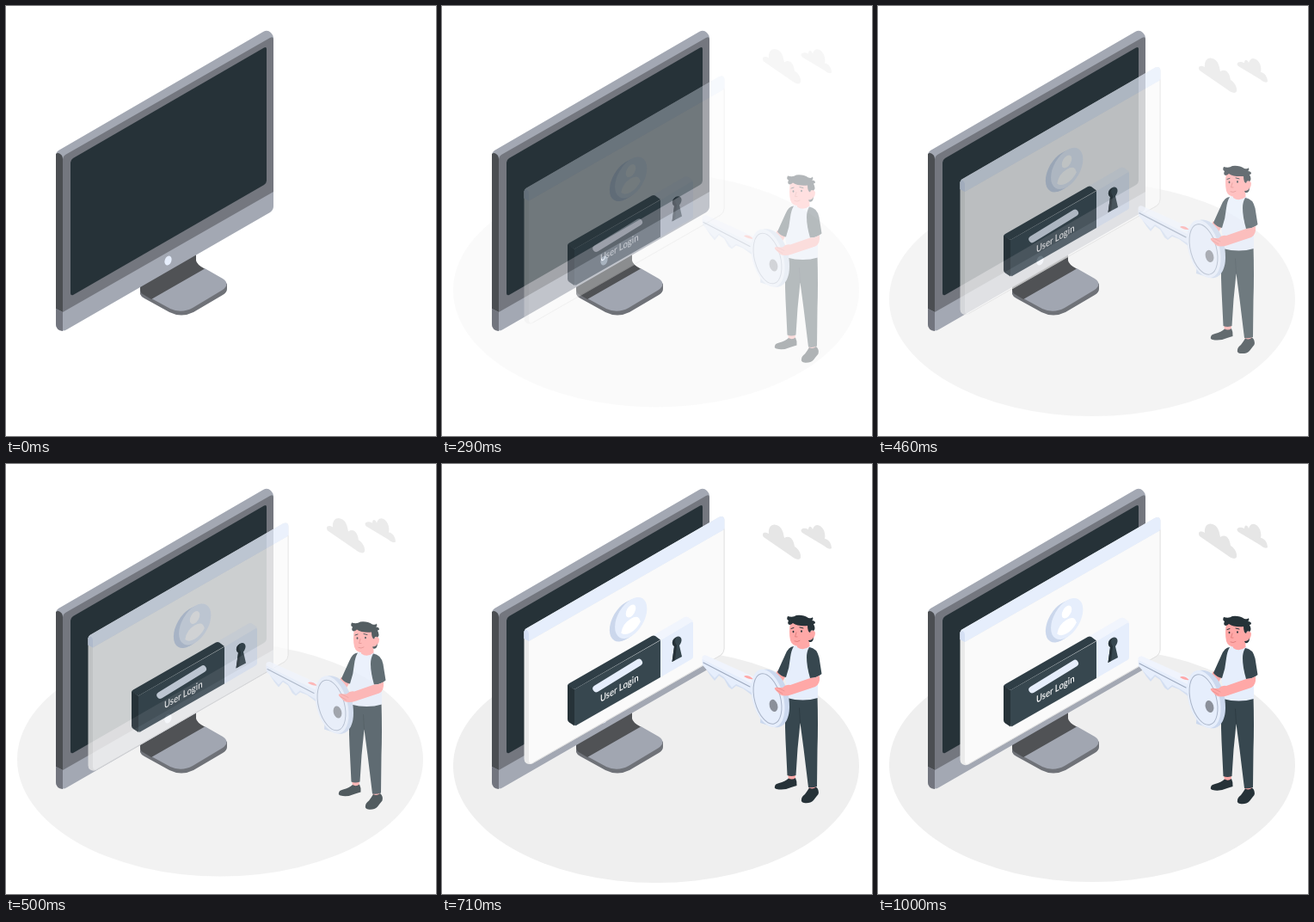
Write an HTML page that moves like this. It is 500 px wide and 500 px high and loops after 1040 ms.

```html
<!DOCTYPE html>
<html lang="en">
<head>
<meta charset="utf-8">
<title>User Login</title>
<style>
  html, body { margin: 0; width: 100%; height: 100%; overflow: hidden; background: #fff; }
  svg { display: block; width: 100vw; height: 100vh; }
  text { font: 600 11.5px Lato, "Open Sans", sans-serif; fill: #fff; }
  .ink { fill: #263238; }
  .slate { fill: #37474f; }
  .ice { fill: #e6eefc; }
  .skin { fill: #ffa8a7; }
  .line { fill: none; stroke-linecap: round; stroke-linejoin: round; }
</style>
</head>
<body>
<svg viewBox="0 0 500 500">
  <g data-dir="-1">
    <ellipse cx="249" cy="350" rx="236" ry="136" fill="#efefef"/>
  </g>

  <g id="monitor">
    <path fill="#6f7278" d="M156 327V335Q157 338 161 340L190 356Q204 363 218 356L252 336Q257 333 257 329V323L230 306Z"/>
    <path fill="#a1a6b1" d="M231 305L252 317Q261 323 252 330L217 351Q204 358 191 352L169 340Z"/>
    <path fill="#505255" d="M156 326L221 288V296Q222 301 231 305.500L169 341L159 335Q156 333 156 329Z"/>
    <path fill="#a3a8b3" d="M58 173Q58 170 61 168L299 30Q304 27 308 31Q311 34 311 37V233Q311 237 307 240L71 376Q66 379 62 376Q58 374 58 370Z"/>
    <path fill="#4b4e52" d="M58 172Q60 170 63 172Q66 174 66 178V356L58 352Z"/>
    <path fill="#72757e" d="M58 352L66 356V378Q58 377 58 370Z"/>
    <path fill="#74777f" d="M66 178Q66 175 69 173L307 37Q311 35 311 39V216L66 356Z"/>
    <path class="ink" d="M75 182Q75 179 78 177L300 48.500Q303 47 303 50V203Q303 206 300 208L78 336Q75 337 75 334Z"/>
    <ellipse class="ice" cx="188.500" cy="296" rx="3.800" ry="5.600" transform="rotate(22 188.500 296)"/>
  </g>

  <g data-dir="-1" fill="#e6e6e6">
    <path d="M374 84C371 79 375 77 380 80C379 72 384 68 389 70C396 72 397 80 398 85C404 81 409 86 410 95C414 97 418 103 417 108C415 112 410 109 406 106Z"/>
    <path d="M419 79C415 75 420 72 426 75C426 71 429 70 431 75C433 68 440 68 444 76C445 79 446 82 445 86C449 86 453 91 453 97C450 99 447 96 444 94Z"/>
  </g>

  <g data-dir="1">
    <g id="panel">
      <path fill="#ebebeb" d="M95.500 196Q96 193.500 98 192.300L322 62.800Q328 60.300 328.500 66V216Q328 221 324 224L105 349.500Q101 351 98 349Q95.500 347.500 95.500 344Z"/>
      <path fill="#fafafa" d="M101 207L328 77V216Q328 220 324 223L106 348Q101 351 101 345Z"/>
      <path class="ice" d="M95.500 196Q96 193.500 98 192.300L322 62.800Q328 60.300 328.500 66V77L101 207L95.500 204Z"/>
      <path fill="#d5e0f4" d="M95.500 196Q96 193.500 98 194Q101 195 101 199V207L95.500 204Z"/>
      <path class="line" stroke="#dedede" stroke-width=".8" d="M328 77V216Q328 220 324 223.500L106 348.500"/>
    </g>
    <g id="avatar">
      <circle r="21.500" fill="#cbd7ec" transform="matrix(.866 -.5 0 1 213.500 183.500)"/>
      <circle r="21.500" fill="#cbd7ec" transform="matrix(.866 -.5 0 1 216.500 182)"/>
      <circle r="21.500" class="ice" transform="matrix(.866 -.5 0 1 219.700 180)"/>
      <g fill="#fff" transform="matrix(.866 -.5 0 1 219.500 180)">
        <circle cy="-8" r="6.700"/>
        <path d="M-13 11Q-11 1 0 1Q11 1 13 11Q8 17 0 17Q-8 17 -13 11Z"/>
      </g>
    </g>
    <g id="lock">
      <path class="ice" d="M254 206L290 184.500Q292 183.500 292 186V225Q292 227 290 228L254 249Z"/>
      <path fill="#f1f5fd" d="M246 200L282 179Q284 178 286 179L292 183.500L254 206Z"/>
      <path class="slate" d="M270 213C266 210 268 204 273 202C278 200 281 206 276 212L279 225L267.500 231Z"/>
      <path class="ink" d="M270 213C266 210 268 204 273 202C270 206 271 209 273 212L271 229L267.500 231Z"/>
    </g>
    <g id="button">
      <path class="slate" d="M154 263L254 206V249L156 305Q154 306 154 303Z"/>
      <path fill="#2f3e46" d="M146 259Q146 257 148 256L244 201Q246 200 248 201L254 205.500L154 263Z"/>
      <path class="ink" d="M146 258L154 263V305.500L148 301.500Q146 300 146 298Z"/>
      <path class="line" stroke="#e6eefc" stroke-width="8" d="M179.300 262.300L229 231.800"/>
      <text transform="matrix(.83 -.479 0 1 184 278.300)">User Login</text>
    </g>
  </g>

  <g data-dir="1">
    <g id="legs">
      <path class="skin" d="M402 361H411L410.500 370L403.500 371ZM426.500 374H435V383L427 384Z"/>
      <path class="slate" d="M400.500 268L436.500 270Q437.500 305 436.500 332L436 376Q431 378 426 377L420.500 332L416.500 302L413.500 332L411.500 363Q406 365 401.500 363L399.500 322Q398 292 400.500 268Z"/>
      <path class="line" stroke="#2b3940" stroke-width=".8" d="M416.500 302L415.500 285"/>
      <path class="ink" d="M387 376Q387 373 392 372Q399 370 403 366.500Q407 369 411 366Q413 370 412.500 375Q409 376 406 377Q397 381 389 379Q386 378 387 376Z"/>
      <path class="ink" d="M418 391Q418 388 422 385Q425 381 427 377.500Q431 380 435 376.500Q439 380 437.500 385Q435 388 432 392Q428 396 421 395Q417 394 418 391Z"/>
    </g>
    <g id="torso">
      <path class="skin" d="M390 241L400 247Q396 255 389 263L378 258Q386 250 390 241Z"/>
      <path class="ice" d="M405 214Q412 211 417 211L427 212Q435 217 437 226V273Q420 278 401 273Q401 255 398 245Q400 222 405 214Z"/>
      <path class="slate" d="M409 213Q403 213 399 223Q394 234 390 243Q394 248 400 249Q404 238 405 226Q406 218 409 213Z"/>
      <path class="slate" d="M427 214Q436 215 438.500 226L441.500 245Q436 250 428 250Q424 236 424 226Q424 219 427 214Z"/>
    </g>
    <g id="head">
      <path class="skin" d="M413 204L427 199L427.500 213Q420 219 413 214Z"/>
      <path class="skin" d="M405 185Q415 180 427 187L428 196Q432 192 434 197Q434 204 428 206Q425 212 416 213Q407 213 405 206Q403 197 405 185Z"/>
      <path class="ink" d="M404 188Q401 187 403 183Q400 182 402 178Q408 180 412 177Q420 176 426 180Q430 181 431 179Q432 182 430 183Q434 183 434 186Q433 187 432 187Q435 193 432 195Q429 193 428 197Q425 196 425 189Q414 190 408 186Q406 188 404 188Z"/>
      <path class="ink" d="M426 206Q431 206 432 202Q432 209 427 208Z"/>
      <g class="ink">
        <ellipse cx="408.500" cy="196" rx=".9" ry="1.300"/>
        <ellipse cx="418" cy="195.500" rx=".9" ry="1.300"/>
      </g>
      <path class="line" stroke="#263238" d="M406 192.500L409 191.500M416 191L420 192"/>
      <path class="line" stroke="#e2807f" d="M412 197L410.500 202H413M410 207Q413 208.500 416 206.500"/>
    </g>
    <g id="key">
      <path fill="#d4dff2" d="M303 233L312 247L317 253L322 247L328 251L333 260L337 263L342 259L350 262L362 271L366 250Z"/>
      <path fill="#f0f4fd" d="M302.500 226Q303 223 307 223.500L366 250L364 262L303 233Z"/>
      <path class="ice" d="M302.500 228L364 258L362 268L350 261L342 257L337 261L328 249L322 245L317 250L303 235Z"/>
      <path class="line" stroke="#9fabc0" stroke-width="1.200" d="M304 232L358 260"/>
      <path class="skin" d="M351 248Q353 246 358 248L362 251Q358 252 351 248Z"/>
      <path fill="#cbd8ee" d="M374 240C390 237 404 258 404 283C404 299 397 309 386 307L370 302Z"/>
      <ellipse class="ice" cx="379" cy="273.500" rx="18" ry="34.500" transform="rotate(-15 379 273.500)"/>
      <ellipse class="line" cx="378.500" cy="274" rx="15" ry="30" transform="rotate(-15 378.500 274)" stroke="#a9b4c8"/>
      <ellipse cx="385.500" cy="282" rx="4.700" ry="7.200" transform="rotate(-15 385.500 282)" fill="#8b909a"/>
    </g>
    <path class="skin" d="M428 250Q434 250 439 247Q440 257 434 260L407 269Q398 272 393 269L387 263Q386 260 390 261L396 261Q400 257 405 258Z"/>
    <path class="line" stroke="#e98d8c" stroke-width=".8" d="M390 261L398 265M389 264L396 268"/>
  </g>
</svg>
<script>
  const LOOP = 1040, SHIFT = 30, RATE = 24;
  const parts = [...document.querySelectorAll('[data-dir]')];
  const bezier = (a, b, s) => 3 * (1 - s) * (1 - s) * s * a + 3 * (1 - s) * s * s * b + s * s * s;

  // Slide-in easing that overshoots, then settles.
  function ease(x) {
    if (x >= 1) return 1;
    let lo = 0, hi = 1;
    for (let i = 0; i < 30; i++) {
      const mid = (lo + hi) / 2;
      if (bezier(.36, .5, mid) < x) lo = mid; else hi = mid;
    }
    return bezier(-.01, 1.38, lo);
  }

  function draw(ms) {
    // 24 steps per second, each starting on a multiple of 10 ms.
    const step = Math.ceil((Math.floor(ms / 10) + .5) * 6 / 25) - 1;
    const y = step < 2 ? 0 : ease((step + .5) / RATE);
    for (const el of parts) {
      el.setAttribute('transform', `translate(0 ${el.dataset.dir * SHIFT * (1 - y)})`);
      el.setAttribute('opacity', Math.min(1, Math.max(0, y)));
    }
  }

  const start = performance.now();
  function tick() {
    draw((performance.now() - start) % LOOP);
    requestAnimationFrame(tick);
  }
  tick();
</script>
</body>
</html>
```
